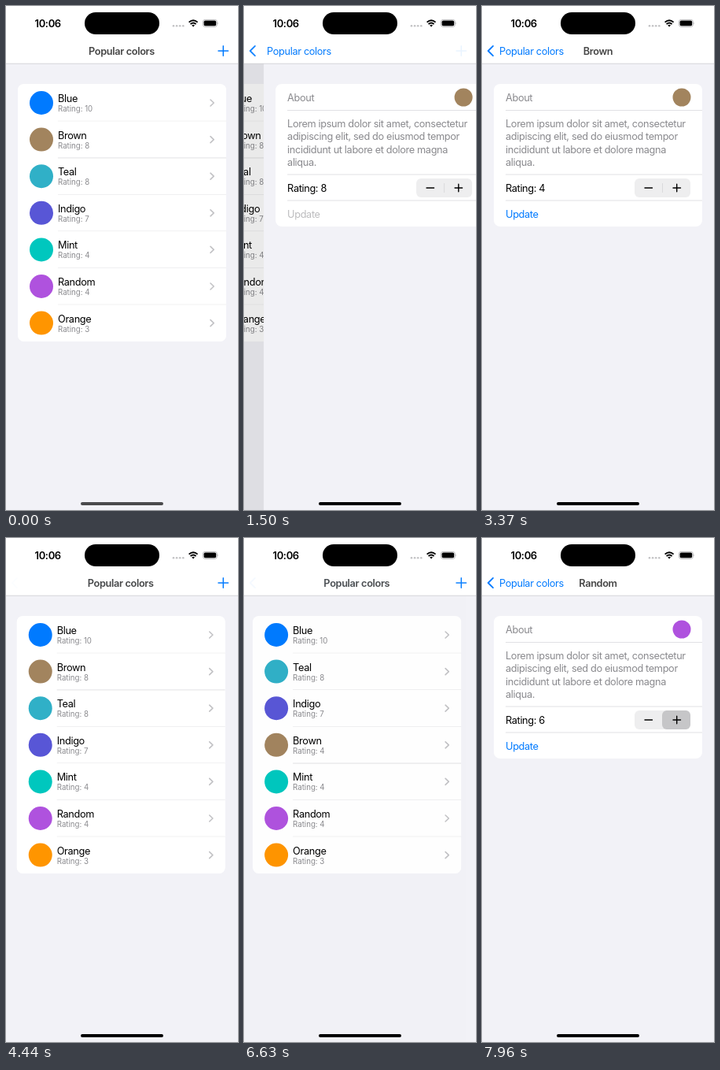
These frames come from a looping animation (295x640 px, 8000 ms). An HTML page:

```html
<!DOCTYPE html>
<html lang="en">
<head>
<meta charset="utf-8">
<title>Popular colors</title>
<style>
  html, body { margin: 0; width: 100%; height: 100%; overflow: hidden; background: #f2f2f7; }
  svg { display: block; width: 100vw; height: 100vh; }
  text { font: 400 12.76px Inter, "Open Sans", sans-serif; letter-spacing: -.36px; fill: #000; }
  text.bold { font-weight: 600; fill: #464646; }
  text.clock { font-weight: 600; font-size: 13px; }
  text.small { font-size: 9.7px; letter-spacing: -.02px; fill: #8a8a8e; }
  text.gray { fill: #8a8a8e; }
  text.blue { fill: #007aff; }
  text.off { fill: #bcbcbe; }
  .line { fill: none; stroke-linecap: round; stroke-linejoin: round; }
  .sep { stroke: #dadadd; stroke-width: .8; }
  .accent { stroke: #007aff; }
</style>
</head>
<body>
<svg viewBox="0 0 295 640" preserveAspectRatio="none">
  <defs>
    <clipPath id="listCard"><rect x="15" y="99" width="265" height="327" rx="8"/></clipPath>
  </defs>
  <rect width="295" height="640" fill="#f2f2f7"/>

  <g id="list">
    <rect x="15" y="99" width="265" height="327" rx="8" fill="#fff"/>
    <g id="rows" clip-path="url(#listCard)"></g>
  </g>
  <rect id="dim" width="295" height="640"/>

  <g id="detail">
    <rect width="295" height="640" fill="#f2f2f7"/>
    <rect x="15" y="99" width="265" height="181" rx="8" fill="#fff"/>
    <path class="sep" d="M30 132.5H280M30 214H280M30 247H280"/>
    <text class="gray" x="30" y="121">About</text>
    <circle id="swatch" cx="254" cy="116" r="11.5"/>
    <g id="about"></g>
    <text id="rating" x="30" y="235.5"></text>
    <rect x="194" y="219" width="71" height="24" rx="6" fill="#eeeeef"/>
    <path id="divider" d="M229.5 225V237" stroke="#dadadc"/>
    <rect id="press" y="219" width="36" height="24" rx="6" fill="#c6c6c8"/>
    <path class="line" d="M207 231H216.500M243 231H252.500M247.700 226.200V235.800" stroke="#000" stroke-width="1.4"/>
    <text id="update" x="30" y="268.500">Update</text>
  </g>

  <rect width="295" height="73" fill="#fff"/>
  <path d="M0 73.200H295" stroke="#cfcfd2" stroke-width=".8"/>
  <path id="back" class="line accent" d="M14 50.800L7.800 57L14 63.200" stroke-width="1.8"/>
  <g id="heading">
    <text id="headingGray" class="bold" y="61.500">Popular colors</text>
    <text id="headingBlue" class="blue" y="61.500">Popular colors</text>
  </g>
  <text id="name" class="bold" x="147.500" y="61.500" text-anchor="middle"></text>
  <path id="add" class="line accent" d="M270 57H282.500M276.250 50.700V63.300" stroke-width="1.5"/>

  <text class="clock" x="36.500" y="26.700">10:06</text>
  <rect x="100" y="8" width="95" height="28" rx="14"/>
  <g id="dots" fill="#c2c2c4"></g>
  <g class="line" stroke="#000" stroke-width="1.900" style="stroke-linecap:butt">
    <path d="M232.600 20.600Q238.100 15.700 243.600 20.600M234.600 23Q238.100 20 241.600 23"/>
  </g>
  <path d="M236.200 24.600Q238.100 23 240 24.600L238.100 26.600Z"/>
  <rect x="250.400" y="17.400" width="18" height="9" rx="2.800" fill="none" stroke="#a8a8aa" stroke-width=".8"/>
  <rect x="251.600" y="18.600" width="15.600" height="6.600" rx="1.700"/>
  <path d="M269.500 20.500Q271 21.900 269.500 23.300Z" fill="#a8a8aa"/>
  <rect id="home" x="95" y="630" width="105" height="4" rx="2"/>
</svg>

<script>
const LOOP = 8000;
const ROW = 46.6;
const STAGE = 295;
const colors = [
  ['Blue', '#007aff', 10],
  ['Brown', '#a2845e', 8],
  ['Teal', '#30b0c7', 8],
  ['Indigo', '#5856d6', 7],
  ['Mint', '#00c7be', 4],
  ['Random', '#af52de', 4],
  ['Orange', '#ff9500', 3],
];
const lorem = [
  'Lorem ipsum dolor sit amet, consectetur',
  'adipiscing elit, sed do eiusmod tempor',
  'incididunt ut labore et dolore magna',
  'aliqua.',
];
// Each tap on the stepper: [down, up]
const brownTaps = [[2490, 2600], [2720, 2840], [3030, 3140], [3260, 3370]];
const randomTaps = [[7640, 7750], [7960, LOOP]];

const $ = id => document.getElementById(id);
const clamp = (v, lo = 0, hi = 1) => Math.min(hi, Math.max(lo, v));
const shift = (el, x, y = 0) => el.setAttribute('transform', `translate(${x} ${y})`);
const fade = (el, a) => el.setAttribute('opacity', a);
const setText = (el, s) => { if (el.textContent !== s) el.textContent = s; };

function buildRow([name, color, rating], i) {
  const row = document.createElementNS('http://www.w3.org/2000/svg', 'g');
  const rule = i < colors.length - 1 ? '<path class="sep" d="M66 146.300H280"/>' : '';
  row.innerHTML = `<rect x="15" y="99.700" width="265" height="46.600" fill="#fff"/>
    <circle cx="45" cy="123" r="15" fill="${color}"/>
    <text x="66" y="122">${name}</text>
    <text class="small" x="66" y="134">Rating: ${rating}</text>
    <path class="line" d="M260 119L264.200 123L260 127" stroke="#c2c2c5" stroke-width="1.600"/>${rule}`;
  $('rows').append(row);
  return row;
}
const rows = colors.map(buildRow);
const brownRow = rows[1];
const brownRating = brownRow.querySelector('.small');
$('rows').append(brownRow);

$('about').innerHTML = lorem.map((line, i) =>
  `<text class="gray" x="30" y="${153.5 + i * 16.5}">${line}</text>`).join('');
$('dots').innerHTML = [0, 1, 2, 3].map(i =>
  `<circle cx="${213 + i * 4.1}" cy="25.200" r="1.300"/>`).join('');

// Index of the held step, or -1 before the start
const stepAt = (t, start, step) => t < start ? -1 : Math.floor((t - start) / step);

// Critically damped navigation spring, sampled at held steps
function slide(t, start, step, lead, last) {
  const i = stepAt(t, start, step);
  if (i < 0) return 0;
  if (i >= last) return 1;
  const x = 17.1 * (lead + i * .11);
  return 1 - (1 + x) * Math.exp(-x);
}
const push = (t, start) => slide(t, start, 110, .0193, 4);
const pop = t => slide(t, 4120, 106.6, .033, 5);

function drawList(t) {
  const move = clamp((stepAt(t, 4550, 113) + 1) / 4);
  const eased = move * move * (3 - 2 * move);
  rows.forEach((row, i) => {
    const delta = i === 1 ? 2 : i === 2 || i === 3 ? -1 : 0;
    shift(row, 0, (i + delta * eased) * ROW);
  });
  setText(brownRating, `Rating: ${t < 4550 ? 8 : 4}`);
}

function drawDetail(t) {
  const first = t < 5500;
  const [name, color, base] = colors[first ? 1 : 5];
  const taps = first ? brownTaps : randomTaps;
  const count = taps.filter(([down]) => t >= down).length;
  const held = taps.some(([down, up]) => t >= down && t < up);
  setText($('name'), name);
  $('swatch').setAttribute('fill', color);
  setText($('rating'), `Rating: ${base + (first ? -count : count)}`);
  $('update').setAttribute('class', count ? 'blue' : 'off');
  $('press').setAttribute('x', first ? 194 : 229);
  fade($('press'), held ? 1 : 0);
  fade($('divider'), held ? 0 : 1);
}

function render(t) {
  const p = t < 4120 ? push(t, 1280) : t < 6630 ? 1 - pop(t) : push(t, 6630);
  drawList(t);
  drawDetail(t);
  shift($('list'), -.3 * STAGE * p);
  shift($('detail'), STAGE * (1 - p));
  shift($('heading'), 105 - 83 * p);
  fade($('dim'), .09 * p);
  fade($('back'), p);
  fade($('add'), 1 - p);
  fade($('headingGray'), clamp(1 - p * 1.08));
  fade($('headingBlue'), clamp(p * 1.08));
  fade($('name'), clamp((p - .93) / .07));
  $('home').setAttribute('fill', t < 1280 ? '#4a4a4c' : '#000');
}

const begin = performance.now();
function tick() {
  render((performance.now() - begin) % LOOP);
  requestAnimationFrame(tick);
}
tick();
</script>
</body>
</html>
```
